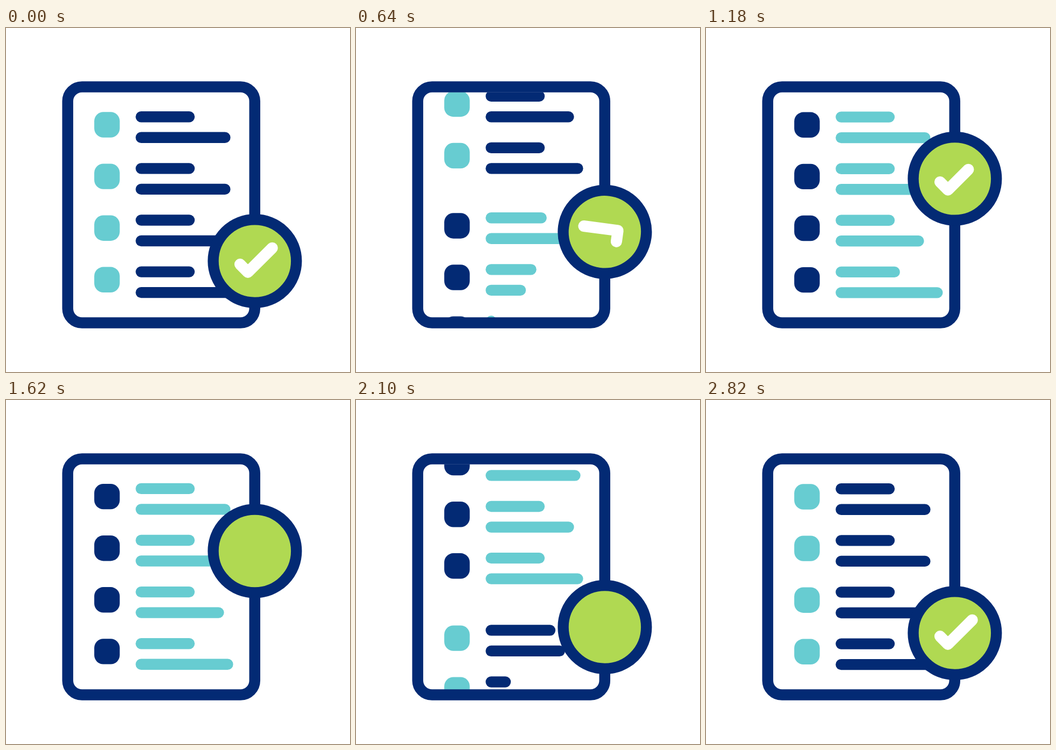
Recreate the animation shown at these times as an HTML page. Size 640 by 640 pixels, loop 3.22 s.

```html
<!DOCTYPE html>
<html lang="en">
<head>
<meta charset="utf-8">
<title>Checklist</title>
<style>
  html, body { margin: 0; width: 100%; height: 100%; overflow: hidden; background: #fff; }
  svg { display: block; width: 100vw; height: 100vh; }
</style>
</head>
<body>
<svg viewBox="0 0 640 640">
  <defs>
    <clipPath id="page"><rect x="115" y="119.6" width="348" height="419.2"/></clipPath>
  </defs>
  <g id="lists" clip-path="url(#page)"></g>
  <rect x="114.8" y="109.4" width="348" height="439.2" rx="26.6" fill="none" stroke="#032a74" stroke-width="20.5"/>
  <g id="badge">
    <circle r="77.4" fill="#b0d952" stroke="#032a74" stroke-width="20.4"/>
    <path id="check" fill="none" stroke="#fff" stroke-width="21" stroke-linecap="round" stroke-linejoin="round"/>
  </g>
</svg>
<script>
const NAVY = '#032a74', TEAL = '#67ccd1';
const LOOP = 3220, HALF = 1600, SCROLL = 1200;
const ROW_GAP = 96.1, LINE_H = 20.4, OVERSHOOT = 20;
const GROW = 300, SETTLE = 120;
const SHORT = 109.9;
const LONG = [176.4, 176.4, 164.4, 181.4];

const $ = id => document.getElementById(id);
const mix = (a, b, p) => a + (b - a) * p;

// Smooth ease in and out between two times
function ease(t, from, to) {
  const p = Math.min(1, Math.max(0, (t - from) / (to - from)));
  return p * p * (3 - 2 * p);
}

function addRect(parent, attrs) {
  const el = document.createElementNS('http://www.w3.org/2000/svg', 'rect');
  for (const key in attrs) el.setAttribute(key, attrs[key]);
  return parent.appendChild(el);
}

function makeList(box, ink, starts) {
  const g = document.createElementNS('http://www.w3.org/2000/svg', 'g');
  $('lists').appendChild(g);
  const lines = [];
  LONG.forEach((long, i) => {
    const y = 156.3 + i * ROW_GAP;
    addRect(g, { x: 164.2, y, width: 47.4, height: 47.4, rx: 17, fill: box });
    [SHORT, long].forEach((width, j) => {
      const el = addRect(g, {
        x: 241.2, y: y - 1.2 + j * 38.5, width, height: LINE_H, rx: LINE_H / 2, fill: ink
      });
      lines.push({ el, width, start: starts[j][i] });
    });
  });
  return { g, lines };
}

const lists = [
  makeList(TEAL, NAVY, [[205, 405, 605, 805], [305, 505, 705, 905]]),
  makeList(NAVY, TEAL, [[254, 455, 675, 820], [335, 530, 724, 900]])
];

function place(list, y) {
  list.g.setAttribute('transform', `translate(0 ${y})`);
}

function growLines(list, t) {
  for (const { el, width, start } of list.lines) {
    const peak = start + GROW;
    const w = mix(LINE_H, width + OVERSHOOT, ease(t, start, peak))
      - OVERSHOOT * ease(t, peak, peak + SETTLE);
    el.setAttribute('width', w);
  }
}

const TICK = [[-27.5, 6], [-12.9, 20.8], [32.4, -24.4]];
const LEG = Math.hypot(14.6, 14.8);
const FULL = LEG + Math.hypot(45.3, 45.2);
const PEAK = FULL + 6;

function tickLength(t) {
  if (t < HALF) return mix(mix(FULL, PEAK, ease(t, 1000, 1100)), 0, ease(t, 1100, 1400));
  return mix(PEAK * ease(t, 2288, 2588), FULL, ease(t, 2588, 2680));
}

function drawTick(len) {
  const [a, b, c] = TICK;
  const along = (p, q, k) => [mix(p[0], q[0], k), mix(p[1], q[1], k)];
  const points = len <= LEG
    ? [a, along(a, b, len / LEG)]
    : [a, b, along(b, c, (len - LEG) / (FULL - LEG))];
  $('check').setAttribute('d', 'M' + points.join('L'));
  $('check').style.display = len > 0.01 ? '' : 'none';
}

function render(t) {
  const back = t >= HALF;
  const local = back ? t - HALF : t;
  const [leaving, coming] = back ? [lists[1], lists[0]] : lists;
  const travel = back ? 422.6 : 418.7;
  const shift = travel * ease(local, 0, SCROLL);

  place(leaving, -shift);
  place(coming, travel - shift);
  growLines(leaving, Infinity);
  growLines(coming, local >= SCROLL + 200 ? Infinity : local);

  const lift = back ? 1 - ease(local, 0, 600) : ease(local, 400, 1000);
  $('badge').setAttribute('transform',
    `translate(462.9 ${433.6 - 153.2 * lift}) rotate(${back ? 0 : -360 * lift})`);
  drawTick(tickLength(t));
}

const begin = performance.now();
function tick() {
  render((performance.now() - begin) % LOOP);
  requestAnimationFrame(tick);
}
tick();
</script>
</body>
</html>
```
